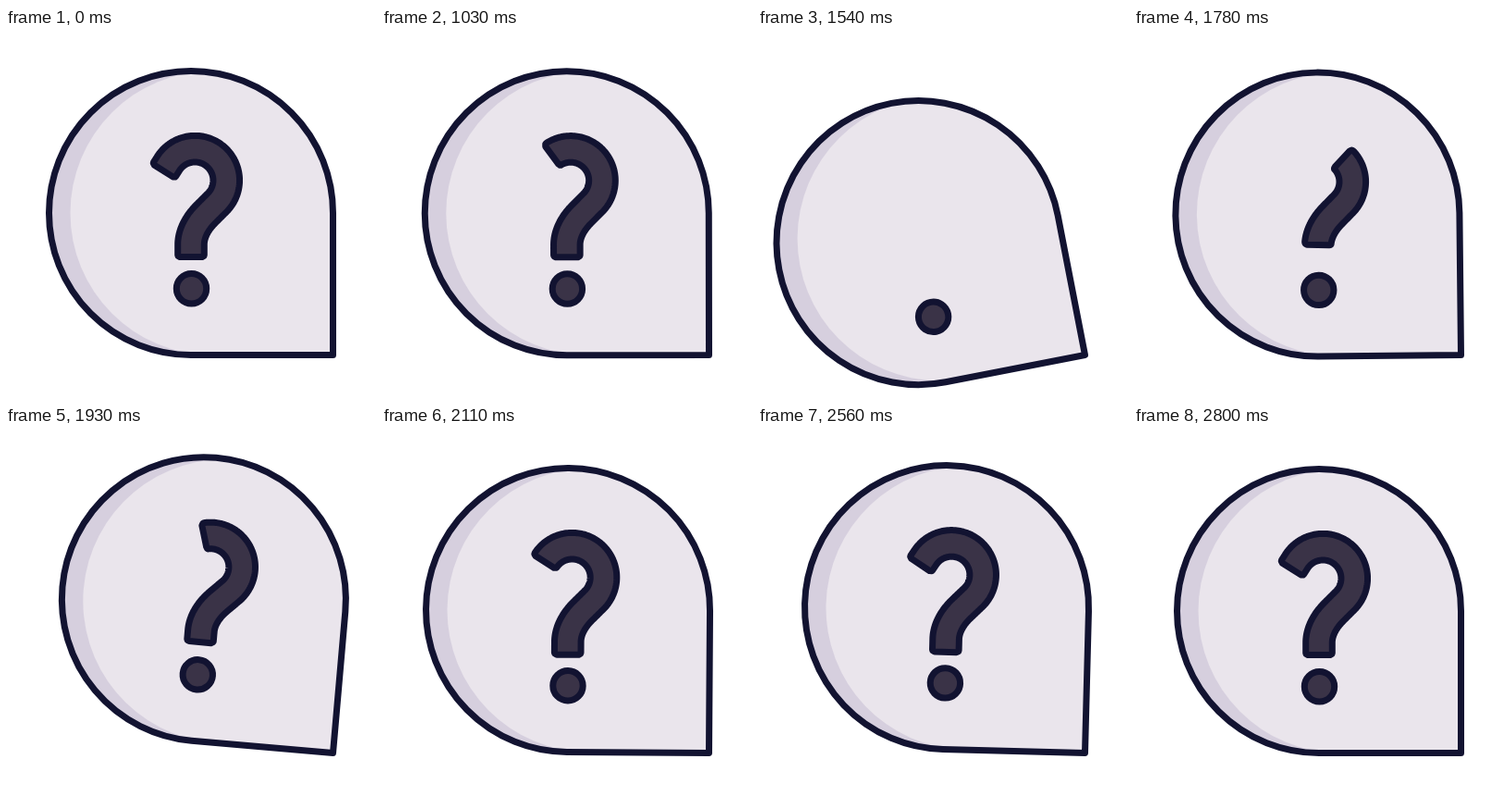
Recreate the animation shown at these times as an HTML page. Size 400 by 400 pixels, loop 2.83 s.

```html
<!DOCTYPE html>
<html>
<head>
<meta charset="utf-8">
<style>
  html, body { margin: 0; width: 100%; height: 100%; overflow: hidden; background: #fff; }
  svg { display: block; width: 100vw; height: 100vh; }
  .line { stroke: #121331; stroke-width: 7; stroke-linejoin: round; }
</style>
</head>
<body>
<svg viewBox="0 0 400 400">
  <defs>
    <path id="drop" d="M353.5 353.5H200A153.5 153.5 0 1 1 353.5 200Z"/>
    <clipPath id="inside"><use href="#drop"/></clipPath>
  </defs>
  <g id="bubble">
    <use href="#drop" fill="#d6cfde"/>
    <g clip-path="url(#inside)"><use href="#drop" x="23" fill="#eae5ec"/></g>
    <use href="#drop" class="line" fill="none"/>
    <path id="hook" class="line" fill="#3a3347"/>
    <circle class="line" cx="200.5" cy="281.8" r="16.2" fill="#3a3347"/>
  </g>
</svg>
<script>
const LOOP = 2830, HOLD = 1000, STEP = 30, REGROW = 1543;
const HALF_WIDTH = 14.3, CORNER = 2.5;
const bubble = document.getElementById('bubble');
const hook = document.getElementById('hook');

// Centre line of the question mark, from below the foot of the stem to the tip
const spine = document.createElementNS('http://www.w3.org/2000/svg', 'path');
spine.setAttribute('d', 'M200 252V234C200 225 204 213 216 201L228 189A34 34 0 1 0 175.2 147L170.4 154.6');
const length = spine.getTotalLength();
const FOOT = 4.4, reach = length - FOOT;

// Keyframes: [time, value]
const swing = [[HOLD, 0], [REGROW, -11], [1940, 5], [2252, -3.1], [2540, 1.5], [2800, 0]];
const footLift = [[REGROW, 40], [1940, 1], [2350, -3.5], [2650, 0]];

function valueAt(keys, t) {
  const i = keys.findIndex(([time]) => time > t);
  if (i < 1) return 0;
  const [t0, a0] = keys[i - 1], [t1, a1] = keys[i];
  return a0 + (a1 - a0) * (1 - Math.cos(Math.PI * (t - t0) / (t1 - t0))) / 2;
}

// Falls from 1 to 0, slowing towards the end
const decay = (t, start, duration) =>
  Math.max(0, 1 - Math.max(0, t - start) / duration) ** 2;

// Start and end of the visible part, as distances along the spine
function visiblePart(t) {
  const head = t < REGROW ? decay(t, HOLD, 505) : 1 - 0.79 * decay(t, REGROW, 733);
  return [FOOT + valueAt(footLift, t), FOOT + reach * head];
}

// Outline of the thick stroke with rounded corners
function ribbon(from, to) {
  if (to - from < 1) return '';
  const left = [], right = [], n = 160;
  for (let i = 0; i <= n; i++) {
    const s = from + (to - from) * i / n;
    const p = spine.getPointAtLength(s);
    const a = spine.getPointAtLength(Math.max(0, s - 0.5));
    const b = spine.getPointAtLength(Math.min(length, s + 0.5));
    const gap = Math.max(0, CORNER - Math.min(s - from, to - s));
    const half = HALF_WIDTH - CORNER + Math.sqrt(Math.max(0, CORNER ** 2 - gap ** 2));
    const k = half / Math.hypot(b.x - a.x, b.y - a.y);
    const nx = (b.y - a.y) * k, ny = (a.x - b.x) * k;
    left.push(`${p.x + nx} ${p.y + ny}`);
    right.unshift(`${p.x - nx} ${p.y - ny}`);
  }
  return 'M' + left.concat(right).join('L') + 'Z';
}

function draw(now) {
  const time = now % LOOP;
  const t = Math.max(HOLD, HOLD + Math.floor((time - HOLD) / STEP) * STEP);
  bubble.setAttribute('transform', `rotate(${valueAt(swing, t)} 353.5 353.5)`);
  hook.setAttribute('d', ribbon(...visiblePart(t)));
}

const start = performance.now();
function tick() {
  draw(performance.now() - start);
  requestAnimationFrame(tick);
}
tick();
</script>
</body>
</html>
```
